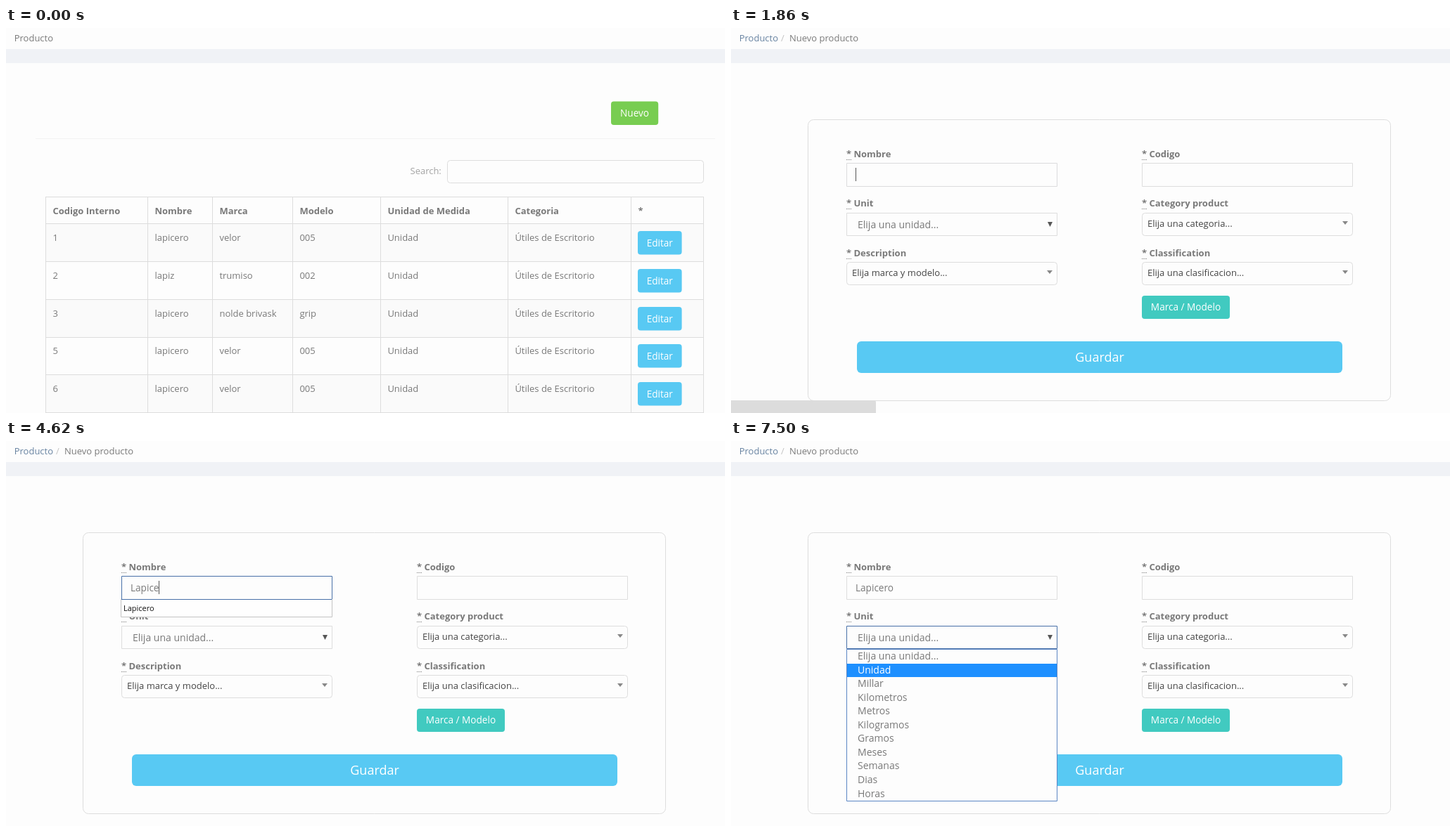
Write an HTML page with a canvas that moves like this. It is 1022x548 px and loops after 8000 ms.

```html
<!DOCTYPE html>
<html lang="es">
<head>
<meta charset="utf-8">
<title>Producto</title>
<style>
html, body { margin: 0; width: 100%; height: 100%; overflow: hidden; background: #fdfdfd; }
canvas { display: block; }
</style>
</head>
<body>
<canvas id="stage" width="1022" height="548"></canvas>
<script>
const LOOP = 8000;
const ctx = document.getElementById('stage').getContext('2d');
const GREY = '#797979', LINE = '#dddddd', PAGE = '#fdfdfd', BLUE = '#58c9f3';
const EDGE = [221, 221, 221], FOCUS = [72, 112, 168];
const clamp = v => Math.max(0, Math.min(1, v));
const mix = (a, b, k) => `rgb(${a.map((v, i) => Math.round(v + (b[i] - v) * k))})`;

// Draws text and returns its end position.
function text(str, x, y, { size = 13, color = GREY, weight = 400, align = 'left' } = {}) {
  ctx.font = `${weight} ${size}px "Open Sans", sans-serif`;
  ctx.fillStyle = color;
  ctx.textAlign = align;
  ctx.fillText(str, x, y);
  return x + ctx.measureText(str).width;
}

function rect(x, y, w, h, color) {
  ctx.fillStyle = color;
  ctx.fillRect(x, y, w, h);
}

function box(x, y, w, h, r, stroke, fill) {
  ctx.beginPath();
  ctx.roundRect(x + 0.5, y + 0.5, w - 1, h - 1, r);
  if (fill) { ctx.fillStyle = fill; ctx.fill(); }
  ctx.strokeStyle = stroke;
  ctx.lineWidth = 1;
  ctx.stroke();
}

function button(label, x, y, w, h, color, baseline, size = 13.6) {
  ctx.fillStyle = color;
  ctx.beginPath();
  ctx.roundRect(x, y, w, h, size > 14 ? 6 : 4);
  ctx.fill();
  text(label, x + w / 2, baseline, { size, color: '#fff', align: 'center' });
}

function triangle(x, y, w, h, color) {
  ctx.fillStyle = color;
  ctx.beginPath();
  ctx.moveTo(x, y);
  ctx.lineTo(x + w, y);
  ctx.lineTo(x + w / 2, y + h);
  ctx.fill();
}

function header(inForm) {
  rect(0, 0, 1022, 548, PAGE);
  rect(0, 30, 1022, 20, '#f0f2f6');
  text('Producto', 11.7, 19, { color: inForm ? '#6682a0' : GREY });
  if (inForm) {
    text('/', 71, 19, { color: '#c4c4c4' });
    text('Nuevo producto', 83, 19);
  }
}

const columns = [56, 201, 293, 407, 532, 713, 888, 991];
const titles = ['Codigo Interno', 'Nombre', 'Marca', 'Modelo', 'Unidad de Medida', 'Categoria', '*'];
const items = [
  ['1', 'lapicero', 'velor', '005'],
  ['2', 'lapiz', 'trumiso', '002'],
  ['3', 'lapicero', 'nolde brivask', 'grip'],
  ['5', 'lapicero', 'velor', '005'],
  ['6', 'lapicero', 'velor', '005']
];

function newButton(t) {
  button('Nuevo', 860, 104.6, 67.2, 33.4, t < 960 ? '#78cd51' : '#6dbb4a', 126);
  if (t < 1500 || t >= 1560) return;
  const shade = ctx.createLinearGradient(0, 105, 0, 112);
  shade.addColorStop(0, 'rgba(0,0,0,.125)');
  shade.addColorStop(1, 'rgba(0,0,0,0)');
  ctx.fillStyle = shade;
  ctx.beginPath();
  ctx.roundRect(860, 105, 67, 33, 4);
  ctx.fill();
}

function listPage(t) {
  header(false);
  newButton(t);
  rect(42, 157, 966, 1, '#f3f3f3');
  text('Search:', 574.5, 208, { color: '#a3a3a3' });
  box(627, 188, 365, 33, 4, LINE);

  const rowTop = i => Math.round(278.5 + i * 53.7);
  for (let i = 0; i < 5; i += 2) rect(56, rowTop(i), 936, 54, '#fafafa');
  for (const x of columns) rect(x, 240, 1, 308, LINE);
  rect(56, 240, 936, 1, LINE);
  for (let i = 0; i < 6; i++) rect(56, rowTop(i) - (i ? 0 : 1), 936, 1, LINE);

  titles.forEach((s, i) => text(s, columns[i] + 10.4, 265, { weight: 700 }));
  items.forEach((item, i) => {
    const y = Math.round(303 + i * 53.75);
    [...item, 'Unidad', 'Útiles de Escritorio'].forEach((s, c) => text(s, columns[c] + 10.4, y));
    button('Editar', 898, y - 14, 62.6, 33.4, BLUE, y + 8);
  });
}

function label(str, x, y) {
  text('* ' + str, x, y, { weight: 700 });
  for (let i = 0; i < 7; i += 2) rect(x + i, y + 3, 1, 1, GREY);
}

function picker(str, x, y) {
  box(x, y, 300, 33, 4, LINE, PAGE);
  text(str, x + 8, y + 20, { color: '#444' });
  triangle(x + 285, y + 12, 8, 5, '#888');
}

const keys = [3660, 3960, 4140, 4320, 4440, 4620, 4800, 4980];
const units = ['Elija una unidad...', 'Unidad', 'Millar', 'Kilometros', 'Metros', 'Kilogramos',
  'Gramos', 'Meses', 'Semanas', 'Dias', 'Horas'];

function caretOn(t) {
  if (t >= 6780) return false;
  const start = t < 3660 ? 1800 : keys.findLast(k => k <= t);
  const half = t < 3660 ? 540 : t < 4980 ? 900 : 525;
  return Math.floor((t - start) / half) % 2 === 0;
}

function suggestions(t) {
  const names = t < 4440 ? ['Lapicero', 'Lapiz'] : ['Lapicero'];
  box(163, 225, 301, names.length > 1 ? 50 : 26, 0, '#c3c3c3', '#fefefe');
  rect(164, 225, 299, 1, mix(EDGE, FOCUS, 1));
  names.forEach((s, i) => text(s, 167, 242 + i * 24, { size: 11, color: '#111' }));
}

function unitList(t) {
  box(164, 296, 300, 217, 0, '#5b86c4', PAGE);
  const active = t < 7500 ? 0 : 1;
  rect(165, 297 + active * 20, 298, active ? 19 : 20, '#1e90ff');
  units.forEach((s, i) => text(s, 180, Math.round(311 + i * 19.55),
    { size: 14, color: i === active ? '#fff' : GREY }));
}

function formPage(t) {
  header(true);
  box(109, 130, 829, 401, 8, LINE);

  const move = clamp((t - 6780) / 180);
  const nameFocus = clamp((t - 1860) / 180) * (1 - move);
  label('Nombre', 164, 184);
  box(164, 192, 300, 34, 0, mix(EDGE, FOCUS, nameFocus));
  const typed = 'Lapicero'.slice(0, keys.filter(k => k <= t).length);
  const end = text(typed, 177, 214, { size: 13.6 });
  if (caretOn(t)) rect(Math.floor(end), 199, 1, 19, '#555');

  label('Codigo', 584, 184);
  box(584, 192, 300, 34, 0, LINE);

  label('Unit', 164, 254);
  box(164, 263, 300, 33, 0, mix(EDGE, FOCUS, move));
  text(units[0], 180, 285, { size: 14 });
  triangle(450, 276, 7, 7, '#555');

  label('Category product', 584, 254);
  picker('Elija una categoria...', 584, 263);
  label('Description', 164, 325);
  picker('Elija marca y modelo...', 164, 333);
  label('Classification', 584, 325);
  picker('Elija una clasificacion...', 584, 333);
  button('Marca / Modelo', 584, 381, 125, 33, '#41cac0', 402);
  button('Guardar', 179, 446, 690, 45, BLUE, 475, 18);

  if (t >= 3660 && t < 6780) suggestions(t);
  if (t >= 6900) unitList(t);
}

function statusBar(t) {
  const shown = t < 1200 ? 0 : t < 1260 ? 0.5 : 1;
  const left = t < 2280 ? 1 : t < 2340 ? 0.66 : t < 2400 ? 0.33 : 0;
  ctx.globalAlpha = shown * left;
  ctx.fillStyle = '#dcdcdc';
  ctx.beginPath();
  ctx.roundRect(-4, 530, 210, 24, 3);
  ctx.fill();
  ctx.globalAlpha = 1;
}

const begin = performance.now();
function frame() {
  const t = (performance.now() - begin) % LOOP;
  (t < 1860 ? listPage : formPage)(t);
  statusBar(t);
  requestAnimationFrame(frame);
}
frame();
</script>
</body>
</html>
```
